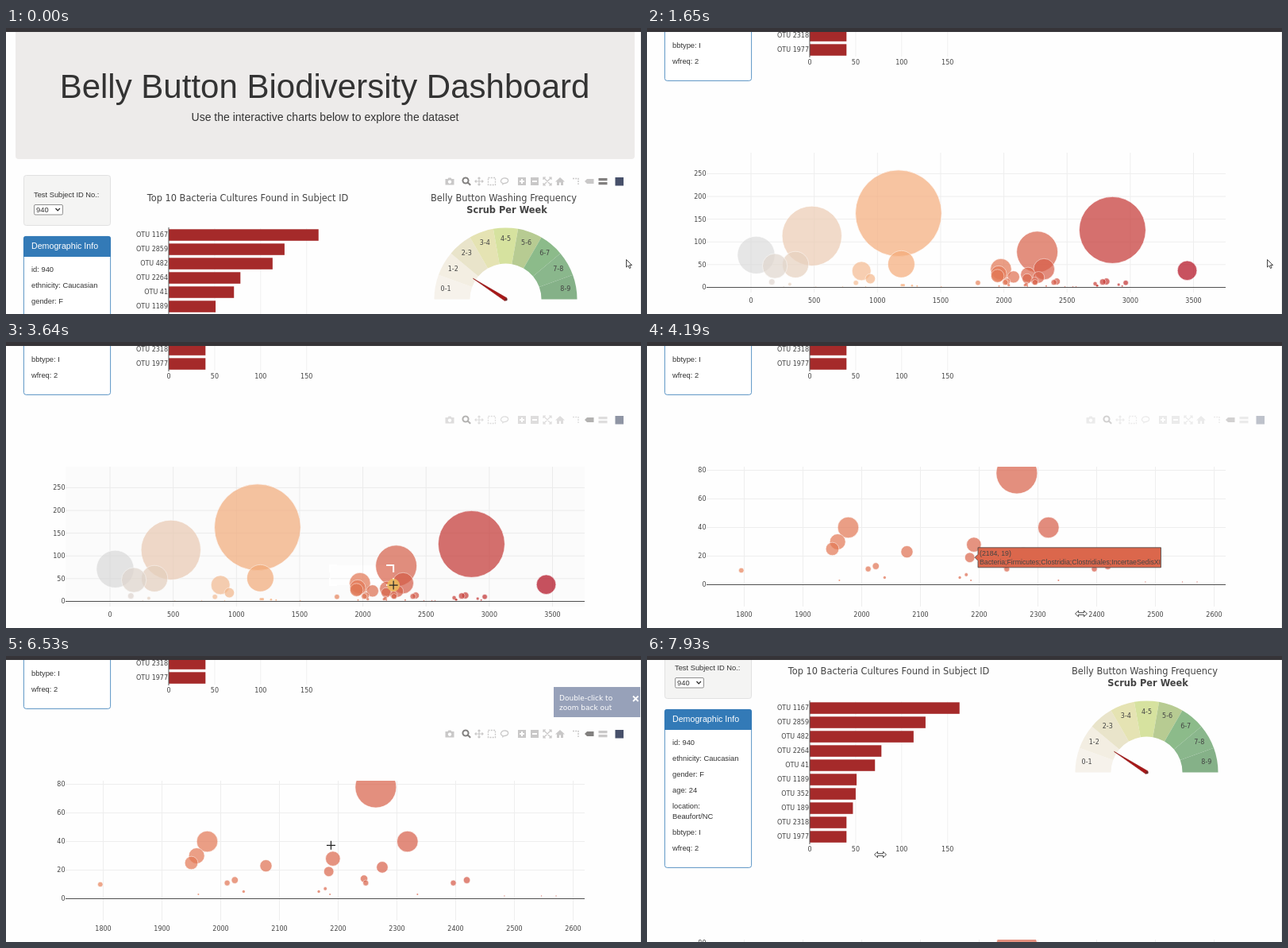
Write an HTML page that moves like this. It is 800 px wide and 360 px high and loops after 8000 ms.

```html
<!DOCTYPE html>
<html lang="en">
<head>
<meta charset="utf-8">
<title>Belly Button Biodiversity Dashboard</title>
<style>
  html, body { margin: 0; width: 100%; height: 100%; overflow: hidden; background: #fefefe; }
  svg { display: block; width: 800px; height: 360px; }
  text { font-family: "Liberation Sans", Arial, sans-serif; fill: #333; white-space: pre; }
  .plot { font-family: "DejaVu Sans", Verdana, sans-serif; fill: #444; }
</style>
</head>
<body>
<svg id="stage" viewBox="0 0 800 360"></svg>
<script>
const LOOP = 8000, BOTTOM = 395, NOTCH = 200 / 3;
const PLOT = { left: 75, right: 729, top: 552, bottom: 728 };

// Markup helpers
const attrs = o => Object.entries(o).map(([k, v]) => ` ${k}="${v}"`).join('');
const el = (tag, o, body = '') => `<${tag}${attrs(o)}>${body}</${tag}>`;
const rect = (x, y, width, height, fill, more = {}) => el('rect', { x, y, width, height, fill, ...more });
const line = (x1, y1, x2, y2, stroke, w = 1) => el('line', { x1, y1, x2, y2, stroke, 'stroke-width': w });
const path = (d, o = {}) => el('path', { d, ...o });
const text = (x, y, size, body, o = {}) => el('text', { x, y, 'font-size': size, ...o }, body);
const label = (x, y, body, anchor = 'middle', size = 8, o = {}) =>
  text(x, y, size, body, { class: 'plot', 'text-anchor': anchor, ...o });
const range = (from, to, step) => Array.from({ length: Math.floor((to - from) / step) + 1 }, (_, i) => from + i * step);

// Timing helpers: keys are [time, ...values]
const clamp = v => Math.max(0, Math.min(1, v));
function track(keys, t) {
  let i = 0;
  while (i < keys.length - 1 && t >= keys[i + 1][0]) i++;
  const a = keys[i], b = keys[i + 1] || a;
  const p = b === a ? 0 : clamp((t - a[0]) / (b[0] - a[0]));
  return a.slice(1).map((v, k) => v + (b[k + 1] - v) * p);
}
const within = (t, a, b) => t >= a && t < b;

// Sample data, largest first; ids past the end of the values hold 2
const ids = [1167, 2859, 482, 2264, 41, 1189, 352, 189, 2318, 1977, 3450, 874, 1959, 2191, 1950, 2077,
  2275, 944, 2184, 2244, 2024, 2419, 2811, 165, 2782, 2247, 2011, 2396, 830, 2964, 1795, 2722, 307, 2178,
  2908, 1193, 2167, 1208, 2039, 1274, 2739, 2737, 1314, 1962, 2186, 2335, 2936,
  907, 2483, 2571, 2546, 725, 1505, 513, 259];
const values = [163, 126, 113, 78, 71, 51, 50, 47, 40, 40, 37, 36, 30, 28, 25, 23, 22, 19, 19, 14, 13, 13,
  13, 12, 12, 11, 11, 11, 10, 10, 10, 8, 7, 7, 6, 5, 5, 5, 5, 4, 4, 4, 3, 3, 3, 3, 3];

const REDS = [[0, 220, 220, 220], [.2, 245, 195, 157], [.4, 245, 160, 105], [1, 178, 10, 28]];
const colorOf = id => `rgb(${track(REDS, (id - 41) / 3409).map(Math.round)})`;

function header() {
  return rect(12, 0, 780, 165, '#edebea', { rx: 4 }) +
    text(401.5, 88, 42, 'Belly Button Biodiversity Dashboard', { 'text-anchor': 'middle' }) +
    text(402, 117, 14, 'Use the interactive charts below to explore the dataset', { 'text-anchor': 'middle' });
}

function sidebar() {
  const info = [['id: 940', 304], ['ethnicity: Caucasian', 324], ['gender: F', 344], ['age: 24', 364],
    ['location:', 384], ['Beaufort/NC', 397], ['bbtype: I', 417], ['wfreq: 2', 437]];
  return rect(22.5, 185.5, 109, 63, '#f4f4f3', { rx: 3, stroke: '#e1e1e1' }) +
    text(35, 213, 9.33, 'Test Subject ID No.:') +
    rect(35.5, 222.5, 36, 12.5, '#fff', { rx: 1.5, stroke: '#777', 'stroke-width': .8 }) +
    text(38, 232, 9.33, '940') +
    path('M62.5 227l2.7 2.8 2.7-2.8', { fill: 'none', stroke: '#222', 'stroke-width': 1.2 }) +
    rect(22.4, 262.4, 109.2, 199, '#fff', { rx: 3, stroke: '#337ab7', 'stroke-width': .8 }) +
    path('M22 288V265q0-3 3-3h104q3 0 3 3v23z', { fill: '#337ab7' }) +
    text(32, 278, 10.67, 'Demographic Info', { style: 'fill:#fff' }) +
    info.map(([s, y]) => text(32, y + 3.3, 9.33, s)).join('');
}

function barChart() {
  const unit = 1.158;
  const ticks = [0, 50, 100, 150].map(v =>
    (v ? line(205 + v * unit, 252, 205 + v * unit, 431, '#f0f0f0') : '') + label(205 + v * unit, 440.5, v));
  const bars = values.slice(0, 10).map((v, i) =>
    rect(205, 253.3 + 18 * i, v * unit, 14.5, '#a52a2a') + label(204, 263.4 + 18 * i, 'OTU ' + ids[i], 'end'));
  return label(304.5, 218, 'Top 10 Bacteria Cultures Found in Subject ID', 'middle', 11.4) +
    ticks.join('') + bars.join('') + line(205, 251, 205, 432, '#555');
}

function gauge() {
  const cx = 629.5, cy = 341.5;
  const fills = ['#f6f2eb', '#f3eee2', '#e9e4ca', '#e5e3b3', '#d6e29f', '#b7cb92', '#8cbb8a', '#8ab78c', '#85b188'];
  const at = (r, deg) => {
    const a = deg * Math.PI / 180;
    return [(cx - r * Math.cos(a)).toFixed(2), (cy - r * Math.sin(a)).toFixed(2)];
  };
  const parts = fills.map((fill, i) => {
    const a = 20 * i, b = a + 20, [x, y] = at(76.5, a + 10);
    return path(`M${at(90, a)}A90 90 0 0 1 ${at(90, b)}L${at(45, b)}A45 45 0 0 0 ${at(45, a)}z`, { fill }) +
      label(x, +y + 2.9, `${i}-${i + 1}`);
  });
  return label(627, 218, 'Belly Button Washing Frequency', 'middle', 11.4) +
    label(631, 233, 'Scrub Per Week', 'middle', 11.4, { 'font-weight': 'bold' }) + parts.join('') +
    path('M588.5 315.3L631.2 340L628.6 343.6z', { fill: '#a81717', stroke: '#8b0f0f', 'stroke-width': .6 }) +
    el('circle', { cx: 630, cy: 341.8, r: 1.7, fill: '#6b2a2a' });
}

// Icons are drawn around their own centre
function modebar(id, y, active) {
  const glyphs = [
    [559, 'M-5.500-3h3l1-1.500h3l1 1.500h3v7.500h-11zM0-1.500a2.200 2.200 0 1 0 .01 0z'],
    [580, 'M-1-4.600a3.600 3.600 0 1 0 .01 0zM1.800 1.600l3.400 3.200', 2],
    [596, 'M-5 0H5M0-5V5M-3.500-1.500L-5 0l1.500 1.500M3.500-1.500L5 0 3.500 1.500M-1.500-3.500L0-5l1.500 1.500M-1.500 3.500L0 5l1.500-1.500', 1.2],
    [612, 'M-4.500-4.500h9v9h-9z', 1.3, '2 1.300'],
    [628, 'M-2 2.500C-7 1-4-4.500 1-4S6 2 0 2.500q-3 0-2 2', 1.3],
    [650, 'M-5-5H5V5H-5zM-1-3v2h-2v2h2v2h2V1h2v-2H1v-2z'],
    [666, 'M-5-5H5V5H-5zM-3-1v2h6v-2z'],
    [682, 'M-4.500-4.500l9 9M4.500-4.500l-9 9M-2-5h-3v3M2-5h3v3M-2 5h-3v-3M2 5h3v-3', 1.2],
    [698, 'M0-5L6 .5H4V5H1V1.500h-2V5h-3V.5h-2z'],
    [718, 'M-4-3.500H3V4', 1.5, '2 1.200'],
    [735, 'M-6 0l3-3h8.500v6H-3z'],
    [752, 'M-5.500-4h11v3.300h-11zM-5.500 1h11v3.300h-11z']
  ];
  const icons = glyphs.map(([x, d, stroke, dash], i) => {
    const color = active.includes(i) ? '#82807f' : '#c9c8c8';
    return path(d, {
      transform: `translate(${x} ${y})`, 'fill-rule': 'evenodd', fill: stroke ? 'none' : color,
      ...(stroke && { stroke: color, 'stroke-width': stroke }), ...(dash && { 'stroke-dasharray': dash })
    });
  });
  return el('g', { id }, icons.join('') + rect(767.5, y - 5, 10.5, 10.5, '#47506a'));
}

const wide = { x: v => 131 + v * .15929, y: v => 721.5 - v * .5725, xs: range(0, 3500, 500), ys: range(0, 250, 50) };
const close = { x: v => 122.5 + (v - 1800) * .74, y: v => 700.5 - v * 1.8, xs: range(1800, 2600, 100), ys: range(0, 80, 20) };

function bubbleChart(id, view) {
  const columns = view.xs.map(v => line(view.x(v), PLOT.top, view.x(v), PLOT.bottom, '#eee') + label(view.x(v), 740.5, v));
  const rows = view.ys.map(v =>
    line(PLOT.left, view.y(v), PLOT.right, view.y(v), v ? '#eee' : '#505050') + label(74.5, view.y(v) + 2.9, v, 'end'));
  const dots = ids.map((n, i) => {
    const v = values[i] || 2;
    return el('circle', {
      cx: view.x(n), cy: view.y(v), r: v / 3, fill: colorOf(n), opacity: .7,
      ...(v > 5 && { stroke: '#fff', 'stroke-width': .67 })
    });
  });
  return el('g', { id }, columns.join('') + rows.reverse().join('') + el('g', { 'clip-path': 'url(#plotArea)' }, dots.join('')));
}

function tooltip(id, view, otu, value, taxon, width, side, ink) {
  const tip = view.x(otu) + side * value / 3, y = view.y(value), edge = tip + side * 4, far = edge + side * width;
  const o = { 'text-anchor': side > 0 ? 'start' : 'end', style: `fill:${ink}` };
  return el('g', { id },
    path(`M${tip} ${y}L${edge} ${y - 4}V${y - 12.5}H${far}V${y + 12.5}H${edge}V${y + 4}z`,
      { fill: colorOf(otu), stroke: '#444', 'stroke-width': .8 }) +
    text(edge + side * 2, y - 2, 8.75, `(${otu}, ${value})`, o) + text(edge + side * 2, y + 9, 8.75, taxon, o));
}

const clostridia = 'Bacteria;Firmicutes;Clostridia;Clostridiales;IncertaeSedisXI';
const campylo = 'Bacteria;Proteobacteria;Epsilonproteobacteria;Campylobacterales;Campylobacteraceae;Campylobacter';
const outline = { fill: '#fff', stroke: '#333', 'stroke-width': .9, 'stroke-linejoin': 'round' };

document.getElementById('stage').innerHTML =
  el('clipPath', { id: 'plotArea' }, rect(PLOT.left, PLOT.top, PLOT.right - PLOT.left, PLOT.bottom - PLOT.top, '#000')) +
  rect(0, 0, 800, 360, '#fefefe') +
  el('g', { id: 'page' },
    header() + sidebar() + barChart() + gauge() + bubbleChart('wide', wide) + bubbleChart('close', close) +
    path('', { id: 'shade', 'fill-rule': 'evenodd' }) +
    path('', { id: 'corners', fill: 'none', stroke: '#fff', 'stroke-width': 2 }) +
    modebar('topBar', 193, [1, 11]) + modebar('lowBar', 493, [1, 10]) +
    tooltip('tipA', wide, 3450, 37, campylo, 403, -1, '#fff') +
    tooltip('tipB', close, 2184, 19, clostridia, 230.5, 1, '#444') +
    tooltip('tipC', close, 2191, 28, clostridia, 230.5, 1, '#444')) +
  el('g', { id: 'notice' },
    rect(690, 39, 110, 38, '#97a1b9') +
    ['Double-click to', 'zoom back out'].map((s, i) => label(697, 55.5 + 12.5 * i, s, 'start', 9, { style: 'fill:#fff' })).join('') +
    path('M790 50.500l6.500 6.500M796.500 50.500l-6.500 6.500', { stroke: '#fff', 'stroke-width': 1.8 })) +
  line(799.5, 5, 799.5, 360, '#ececec') + rect(0, 0, 800, 5, '#363438') +
  el('g', { id: 'cursor' },
    el('circle', { id: 'press', r: 8, fill: '#edbd5c', opacity: .85 }) +
    path('M0 0V9.500L2.300 7.500L4 11L5.500 10.300L4 7H7z', { id: 'arrow', ...outline }) +
    path('M-7.500 0L-3.500-3.700V-1.300H3.500V-3.700L7.500 0L3.500 3.700V1.300H-3.500V3.700z', { id: 'resize', ...outline }) +
    path('M-5.500 0H5.500M0-5.500V5.500', { id: 'cross', stroke: '#222', 'stroke-width': 1.2 }));

const $ = Object.fromEntries([...document.querySelectorAll('[id]')].map(n => [n.id, n]));
const show = (node, alpha) => {
  node.style.display = alpha > 0 ? '' : 'none';
  node.style.opacity = node === $.press ? .85 : +alpha;
};

const wheelTimes = [400, 660, 860, 990, 1120, 1650];
const scrollBack = [[7040, BOTTOM], [7240, BOTTOM - 2 * NOTCH], [7420, BOTTOM - 2 * NOTCH], [7600, BOTTOM - 3 * NOTCH]];
const pointer = [[0, 781.5, 291.5], [2070, 781.5, 291.5], [2150, 686, 308], [2680, 686, 308], [2970, 716, 334],
  [3300, 716, 334], [3570, 408, 281], [3640, 488, 306], [4050, 547, 342], [4260, 547, 342], [4890, 421, 254],
  [6300, 421, 254], [6640, 404, 231], [7240, 404, 231], [7420, 404, 231], [7860, 310, 246], [7930, 294, 250]];
const barFade = [[2070, 0], [2150, 1], [3300, 1], [3640, .6], [4190, .35], [4890, 1], [7300, 1], [7420, 0]];
const noticeFade = [[4190, 0], [4890, 1], [7240, 1], [7600, 0]];

function drawZoomBox(t, x, y) {
  const on = within(t, 3570, 4120);
  show($.shade, on);
  show($.corners, on);
  if (!on) return;
  const x0 = 408, y0 = 281 + BOTTOM, y1 = Math.min(y + BOTTOM, PLOT.bottom);
  $.shade.setAttribute('d', `M${PLOT.left} ${PLOT.top}H${PLOT.right}V${PLOT.bottom}H${PLOT.left}zM${x0} ${y0}H${x}V${y1}H${x0}z`);
  $.shade.setAttribute('fill-opacity', .4 * clamp((t - 3640) / 200) + .01);
  $.corners.setAttribute('d', `M${x0} ${y0 + 9}V${y0}H${x0 + 9}M${x - 9} ${y0}H${x}V${y0 + 9}M${x} ${y1 - 9}V${y1}H${x - 9}M${x0 + 9} ${y1}H${x0}V${y1 - 9}`);
}

function render(t) {
  const scroll = t < 7040 ? Math.min(BOTTOM, wheelTimes.filter(w => t >= w).length * NOTCH) : track(scrollBack, t)[0];
  const [x, y] = track(pointer, t);
  $.page.setAttribute('transform', `translate(0 ${-scroll})`);
  $.cursor.setAttribute('transform', `translate(${x} ${y})`);

  show($.wide, t < 4120);
  show($.close, t >= 4120);
  drawZoomBox(t, x, y);

  show($.topBar, t < 860);
  show($.lowBar, track(barFade, t)[0]);
  show($.notice, track(noticeFade, t)[0]);
  show($.tipA, within(t, 2150, 2680));
  show($.tipB, within(t, 4120, 4400));
  show($.tipC, within(t, 4890, 6400));

  const resize = within(t, 4120, 4400) || t >= 7790;
  const cross = within(t, 2150, 4120) || within(t, 4400, 7040);
  show($.resize, resize);
  show($.cross, cross);
  show($.arrow, !resize && !cross);
  show($.press, within(t, 3500, 4120));
}

const start = performance.now();
function tick() {
  render((performance.now() - start) % LOOP);
  requestAnimationFrame(tick);
}
tick();
</script>
</body>
</html>
```
